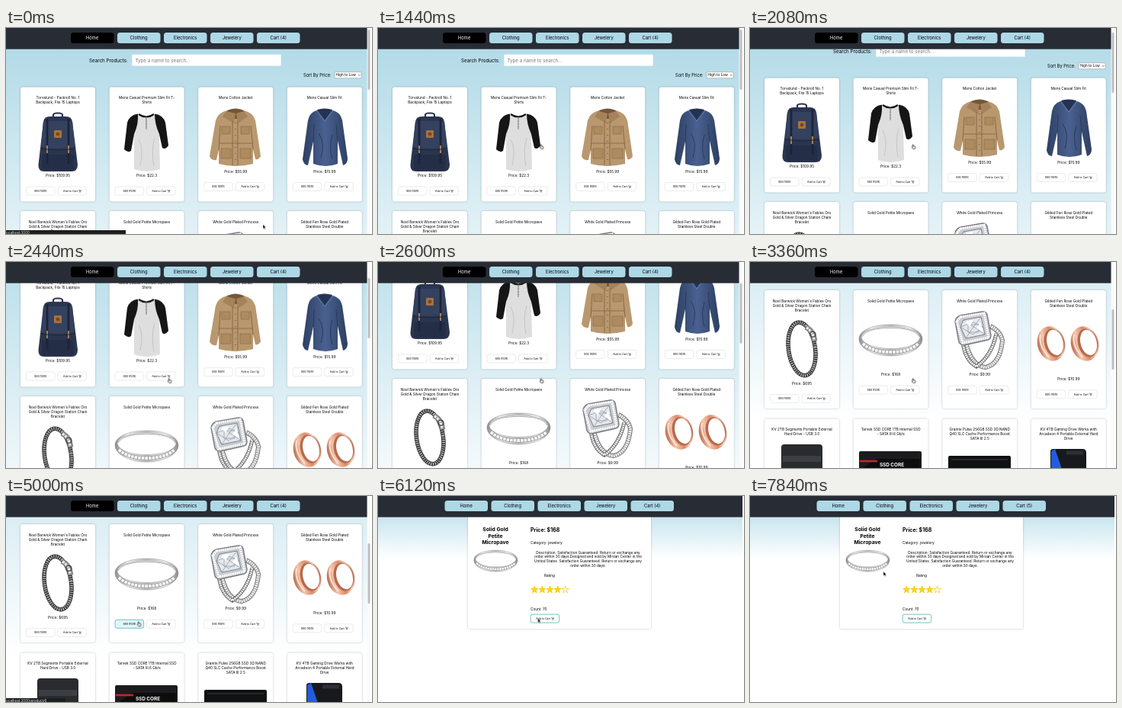
An HTML page for the animation above (8000 ms loop, 480 by 270 pixels).

```html
<!DOCTYPE html>
<html lang="en">
<head>
<meta charset="utf-8">
<title>Shop</title>
<style>
html, body { margin: 0; width: 100%; height: 100%; overflow: hidden; background: #fff; }
svg { display: block; width: 100vw; height: 100vh; font-family: Inter, Roboto, sans-serif; }
.card { fill: #fff; filter: drop-shadow(0 .4px 1px #0004); }
.btn { fill: #fff; stroke: #ddd; stroke-width: .6; }
.tab { fill: #add8e6; }
.mid { text-anchor: middle; }
.bold { font-weight: 700; }

#scroll, #thumb, #list, #nav2, #detail, #cursor, #arrow, #hand, #bar1, #bar2,
#four, #five, .hot, .add { animation: 8s linear infinite; }
#scroll { animation-name: scroll; }
#thumb { animation-name: thumb; }
#cursor { animation-name: move; }
.hot { animation-name: hot; }
.add { animation-name: add; }
#list, #nav2, #detail, #arrow, #hand, #bar1, #bar2, #four, #five { animation-timing-function: step-end; }
#list { animation-name: list; }
#nav2 { animation-name: nav2; }
#detail { animation-name: detail; }
#arrow { animation-name: arrow; }
#hand { animation-name: hand; }
#bar1 { animation-name: bar1; }
#bar2 { animation-name: bar2; }
#four { animation-name: four; }
#five { animation-name: five; }

@keyframes scroll {
  0% { transform: translateY(0); }
  24.5% { transform: translateY(0); animation-timing-function: steps(3); }
  26% { transform: translateY(-12px); animation-timing-function: steps(13); }
  32.5% { transform: translateY(-87px); animation-timing-function: steps(11); }
  38% { transform: translateY(-135px); animation-timing-function: steps(8); }
  42%, 100% { transform: translateY(-203px); }
}
@keyframes thumb {
  0% { transform: translateY(0); }
  24.5% { transform: translateY(0); animation-timing-function: steps(3); }
  26% { transform: translateY(3.5px); animation-timing-function: steps(13); }
  32.5% { transform: translateY(25.7px); animation-timing-function: steps(11); }
  38% { transform: translateY(40px); animation-timing-function: steps(8); }
  42%, 100% { transform: translateY(60px); }
}
@keyframes move {
  0%, 6.5% { transform: translate(337px, 257.5px); animation-timing-function: ease-in-out; }
  16.5%, 48.5% { transform: translate(212.5px, 152.5px); animation-timing-function: ease-in-out; }
  54%, 65.5% { transform: translate(172.5px, 164.5px); animation-timing-function: ease-in-out; }
  78.5%, 95.5% { transform: translate(211.5px, 160px); animation-timing-function: ease-in-out; }
  98%, 100% { transform: translate(175px, 99px); }
}
@keyframes hot { 0%, 53% { fill: #fff; stroke: #ddd; } 55%, 100% { fill: #e0f7fa; stroke: #159a9c; } }
@keyframes add { 0%, 77.5% { fill: #fff; } 78.5%, 95.5% { fill: #e0f7fa; } 97%, 100% { fill: #fff; } }
@keyframes list { 0% { visibility: visible; } 63%, 100% { visibility: hidden; } }
@keyframes nav2 { 0% { visibility: hidden; } 63%, 100% { visibility: visible; } }
@keyframes detail { 0% { visibility: hidden; } 65.5%, 100% { visibility: visible; } }
@keyframes arrow { 0% { opacity: 1; } 16.5% { opacity: 0; } 63% { opacity: 1; } 78% { opacity: 0; } 96%, 100% { opacity: 1; } }
@keyframes hand { 0% { opacity: 0; } 16.5% { opacity: 1; } 63% { opacity: 0; } 78% { opacity: 1; } 96%, 100% { opacity: 0; } }
@keyframes bar1 { 0% { opacity: 1; } 8%, 100% { opacity: 0; } }
@keyframes bar2 { 0% { opacity: 0; } 54% { opacity: 1; } 65.5%, 100% { opacity: 0; } }
@keyframes four { 0% { opacity: 1; } 90%, 100% { opacity: 0; } }
@keyframes five { 0% { opacity: 0; } 90%, 100% { opacity: 1; } }
</style>
</head>
<body>
<svg viewBox="0 0 480 270" preserveAspectRatio="none">
<defs>
  <linearGradient id="sky" x2="0" y2="1"><stop stop-color="#add8e6"/><stop offset="1" stop-color="#fff"/></linearGradient>
  <linearGradient id="silver"><stop stop-color="#8d8d90"/><stop offset=".2" stop-color="#eee"/><stop offset=".5" stop-color="#bbb"/><stop offset=".8" stop-color="#f2f2f2"/><stop offset="1" stop-color="#88888c"/></linearGradient>
  <linearGradient id="rose"><stop stop-color="#b9694a"/><stop offset=".25" stop-color="#f6c7ae"/><stop offset=".55" stop-color="#d98d6c"/><stop offset=".8" stop-color="#f8d5c2"/><stop offset="1" stop-color="#b8694b"/></linearGradient>
  <linearGradient id="denim"><stop stop-color="#2d3f62"/><stop offset=".5" stop-color="#4a6190"/><stop offset="1" stop-color="#2d3f62"/></linearGradient>

  <g id="ring">
    <path fill="url(#silver)" stroke="#77777b" stroke-width=".4" fill-rule="evenodd"
      d="M0 19C0 7 19 0 41.5 0S83 7 83 19 64 41 41.5 41 0 31 0 19ZM3 16.5C4 25 20 31.5 41.5 31.5S79 25 80 16.5C78 8 62 3 41.5 3S5 8 3 16.5Z"/>
    <path d="M5 25C14 33 27 36 41.5 36S69 33 78 25" fill="none" stroke="#999" stroke-width="5.4"/>
    <path d="M5 25C14 33 27 36 41.5 36S69 33 78 25" fill="none" stroke="#f7f7f7" stroke-width="3.8" stroke-dasharray="3.6 1"/>
    <path d="M4 16C9 7 24 4.500 41.500 4.500S74 7 79 16" fill="none" stroke="#aaa" stroke-width="1"/>
  </g>

  <g id="band">
    <ellipse cx="19" cy="23" rx="18" ry="23" fill="url(#rose)" transform="rotate(-14 19 23)"/>
    <ellipse cx="22.500" cy="22" rx="12.500" ry="19" fill="#b86a4c" transform="rotate(-14 22.5 22)"/>
    <ellipse cx="24" cy="21.500" rx="10.500" ry="17" fill="#fff" transform="rotate(-14 24 21.5)"/>
    <path d="M5 11Q2 26 16 41" fill="none" stroke="#fbe3d6" stroke-width="2"/>
  </g>

  <g id="trolley" fill="none" stroke="#333" stroke-width=".4">
    <path d="M0 .3H.8L1.500 2.500H3.300L3.800 .9H1M1.400 1.700H3.500"/>
    <circle cx="1.700" cy="3.300" r=".25"/><circle cx="3.100" cy="3.300" r=".25"/>
  </g>
</defs>

<g id="list">
  <g id="scroll">
    <rect width="474" height="413" fill="url(#sky)"/>
    <g id="search"></g>
    <g id="cards"></g>

    <!-- backpack -->
    <g>
      <path d="M62 119V114Q62 111.500 68 111.500T74 114V119" fill="none" stroke="#26314a" stroke-width="2.2"/>
      <path d="M49 123Q50 116 57 116H79Q86 116 87 123L94 179Q94 188 86 188H50Q42 188 42.500 179Z" fill="#2a354f"/>
      <path d="M49 122H87L90 156Q68 160 46 156Z" fill="#34415f"/>
      <path d="M47 166H89V186H47Z" fill="#242e46"/>
      <path d="M54 119V178M82 119V178" stroke="#1c2437" stroke-width="2.600"/>
      <path d="M54 154V164M82 154V164" stroke="#b58a5b" stroke-width="1.800"/>
      <path d="M46 158Q68 162 90 158" fill="none" stroke="#1d263b"/>
      <rect x="63" y="134" width="10" height="10" rx="1" fill="#a8713d"/>
      <circle cx="68" cy="139" r="2.300" fill="#6e4826"/>
    </g>

    <!-- raglan shirt -->
    <g>
      <path d="M171 113Q163 115 160 124L155 159Q160 164 164 161L168 141V185Q184 191 202 185L201 141L205 157Q209 158 213 154L209 124Q206 115 197 113Q184 119 171 113Z" fill="#dedede"/>
      <path d="M173 112.500Q162 114 159 124L155 159Q160 164 164 161L168 139Q174 126 173 112.500ZM195 112.500Q206 114 209 124L213 154Q209 160 205 157L201 139Q195 126 195 112.500Z" fill="#151515"/>
      <path d="M174 113Q184 120 194 113" fill="none" stroke="#151515" stroke-width="2.200"/>
      <path d="M184 117V133" stroke="#aaa" stroke-width="1.800"/>
      <path d="M184 118V133" stroke="#444" stroke-width=".8" stroke-dasharray=".8 3"/>
      <path d="M174 146Q181 158 176 180M195 144Q190 160 194 181" fill="none" stroke="#c5c5c5"/>
    </g>

    <!-- jacket -->
    <g>
      <path d="M290 108Q278 111 275 121L267 168Q269 174 276 173L279 160V178Q300 184 324 178V159L327 172Q332 173 334 168L327 121Q324 111 312 108Z" fill="#b9986f"/>
      <path d="M290 108Q301 103 312 108L308 119H295Z" fill="#745638"/>
      <path d="M289 109L284 116 299 125 301 112ZM312 109L317 116 304 125 302 112Z" fill="#a5835a"/>
      <path d="M297 122V180M304 122V180M279 160L281 128M324 159L321 128" fill="none" stroke="#80623f" stroke-width=".9"/>
      <path d="M283 129H294V139H283ZM308 129H319V139H308ZM282 158H295V171H282ZM307 158H321V171H307Z" fill="#ad8a60" stroke="#87683f" stroke-width=".6"/>
      <path d="M279 151H324" stroke="#8d6d48" stroke-width="1"/>
      <path d="M301 124V178" stroke="#594027" stroke-width="1" stroke-dasharray="1 7"/>
    </g>

    <!-- long sleeve -->
    <g>
      <path d="M407 108Q398 111 396 121L389 172Q390 179 396 180L403 149V178Q419 184 435 178V148L442 180Q448 178 448 171L441 121Q439 111 429 108Z" fill="url(#denim)"/>
      <path d="M408 107L418 121 428 107Q418 104 408 107Z" fill="#243352"/>
      <path d="M407 108L418 122 429 108" fill="none" stroke="#5d76a4" stroke-width="1.200"/>
      <path d="M403 149L404 126M435 148L433 126M410 138Q419 150 413 170M428 140Q423 156 428 172" fill="none" stroke="#263757" stroke-width=".9"/>
    </g>

    <!-- bracelet -->
    <g transform="rotate(-8 68 317)" fill="none">
      <ellipse cx="68" cy="317" rx="17.500" ry="35" stroke="#303030" stroke-width="5.500"/>
      <ellipse cx="68" cy="317" rx="17.500" ry="35" stroke="#ddd" stroke-width="3.600" stroke-dasharray="1.200 1.600"/>
      <ellipse cx="68" cy="317" rx="17.500" ry="35" stroke="#555" stroke-width="1" stroke-dasharray="2 1.300"/>
      <path d="M77 289Q87 296 86 309" stroke="#888" stroke-width="7"/>
      <path d="M78 290Q86 297 85.500 308" stroke="#eee" stroke-width="3" stroke-dasharray="3 1"/>
      <circle cx="85" cy="300" r="3.500" stroke="#444" stroke-width="1.200"/>
    </g>

    <use href="#ring" x="143" y="285"/>

    <!-- solitaire -->
    <g>
      <g fill="none">
        <path d="M283 309Q291 340 309 341Q328 337 331 306Q329 294 315 287" stroke="#77777b" stroke-width="6"/>
        <path d="M283 309Q291 340 309 341Q328 337 331 306Q329 294 315 287" stroke="#eee" stroke-width="4" stroke-dasharray="2.200 .7"/>
        <path d="M279 306Q281 331 297 340Q317 326 323 297" stroke="#66666a" stroke-width="5"/>
        <path d="M279 306Q281 331 297 340Q317 326 323 297" stroke="#f4f4f4" stroke-width="3" stroke-dasharray="2 .7"/>
      </g>
      <path d="M276 273L305 268Q310 268 311 272L316 299Q316 304 312 305L281 312Q276 312 274 308L269 281Q270 275 276 273Z" fill="#c9cbd0" stroke="#77797f" stroke-width="1.400"/>
      <path d="M276 275L307 270 313 302 279 309 271 281Z" fill="none" stroke="#fff" stroke-width="3" stroke-dasharray="2 .8"/>
      <path d="M280 279L303 275 308 298 283 303 276 288Z" fill="#e5e9ee" stroke="#666b73" stroke-width=".8"/>
      <path d="M280 279L295 289 308 298M303 275L291 291 283 303M276 288L293 282 306 288 292 298ZM286 285H300V295H286Z" fill="none" stroke="#8b929b" stroke-width=".7"/>
      <path d="M282 281L293 279 288 288ZM302 282L306 295 297 290Z" fill="#fff"/>
    </g>

    <use href="#band" x="376" y="287"/>
    <use href="#band" x="420" y="287"/>

    <!-- drives -->
    <path d="M41 480V446Q41 442 45 442H91Q95 442 95 446V480Z" fill="#292b2e"/>
    <path d="M43 461H93" stroke="#3b3e42" stroke-width="8"/>
    <rect x="143" y="451" width="82" height="30" rx="2" fill="#1c1c1e"/>
    <path d="M145 475L166 461H223V480H145Z" fill="#0d0d0e"/>
    <path d="M144 464H167" stroke="#c5262d" stroke-width="2.500"/>
    <rect x="260" y="457" width="82" height="25" rx="2" fill="#101113"/>
    <path d="M264 462H338" stroke="#25272a" stroke-width="2"/>
    <path d="M394 480V451Q394 448 398 448H436Q441 448 441 453V480Z" fill="#17191d"/>
    <path d="M395 480V451L400 448 411 480Z" fill="#245be0"/>
    <path d="M415 453H437" stroke="#2c3036" stroke-width="5"/>
    <text x="186" y="470.500" class="mid bold" font-size="6.400" fill="#fff">SSD CORE</text>
  </g>
  <rect x="473.500" width="4.500" height="270" fill="#fafafa"/>
  <rect id="thumb" x="474.500" y="2" width="3" height="79" rx="1.500" fill="#bfbfbf"/>
  <g id="nav1"></g>
</g>

<g id="nav2">
  <rect width="478" height="82" fill="url(#sky)"/>
  <g id="detail"></g>
  <g id="tabs"></g>
</g>

<g id="bar1"><rect y="265" width="157" height="5" fill="#1d1e20"/><text x="-1" y="270" font-size="4.500" fill="#ddd">localhost:3000</text></g>
<g id="bar2"><rect y="265" width="78" height="5" fill="#1d1e20"/><text x="-1" y="270" font-size="4.500" fill="#ddd">localhost:3000/product/6</text></g>

<g id="cursor">
  <path id="arrow" d="M0 0V5.600L1.300 4.500 2.200 6.500 3.100 6.100 2.200 4.200H4Z" fill="#000" stroke="#fff" stroke-width=".4"/>
  <path id="hand" d="M.8 .5Q1.400 0 1.800 .6V2.200L4 2.700Q4.600 3 4.400 4.200L3.900 6H1.500L-.3 3.700Q0 3 .8 3.600Z" fill="#fff" stroke="#000" stroke-width=".7"/>
</g>
</svg>

<script>
const put = (id, html) => { document.getElementById(id).innerHTML = html; };
const text = (x, y, s, size, cls = "", fill = "#000") =>
  `<text x="${x}" y="${y + size * .36}" font-size="${size}" class="${cls}" fill="${fill}">${s}</text>`;
const box = (x, y, w, h, r, cls) => `<rect x="${x}" y="${y}" width="${w}" height="${h}" rx="${r}" class="${cls}"/>`;
const lines = (x, y, list, gap, size, cls) => list.map((s, i) => text(x, y + i * gap, s, size, cls)).join("");

const addButton = (x, y, cls) => box(x, y - 5.5, 37.5, 11, 2.5, "btn " + cls) +
  text(x + 7, y, "Add to Cart", 3.5) + `<use href="#trolley" x="${x + 26.8}" y="${y - 1.8}"/>`;

function card(row, col, [title, price, y]) {
  const x = 19 + col * 116.6, mid = x + 49;
  const [top, height] = [[77.5, 150], [240, 155], [408.5, 155]][row];
  let out = box(x, top, 98, height, 3, "card") + lines(mid, top + 14.3, title, 5.8, 4.7, "mid");
  if (!price) return out;
  const by = y + 20, hot = row === 1 && col === 1 ? "hot" : "";
  return out + text(mid, y, "Price: $" + price, 4.75, "mid") +
    box(x + 7.5, by - 5.5, 37.5, 11, 2.5, "btn " + hot) +
    text(x + 26.2, by, "See more", 3.7, "mid") + addButton(x + 49, by, "");
}

const goods = [
  [
    [["Torvelund - Packroll No. 1", "Backpack, Fits 15 Laptops"], "109.95", 193.5],
    [["Mens Casual Premium Slim Fit T-", "Shirts"], "22.3", 193.5],
    [["Mens Cotton Jacket"], "55.99", 188],
    [["Mens Casual Slim Fit"], "15.99", 188]
  ], [
    [["Noel Barwick Women's Fables Oro", "Gold &amp; Silver Dragon Station Chain", "Bracelet"], "695", 362],
    [["Solid Gold Petite Micropave"], "168", 350.7],
    [["White Gold Plated Princess"], "9.99", 350.7],
    [["Gilded Fen Rose Gold Plated", "Stainless Steel Double"], "10.99", 356.3]
  ], [
    [["KV 2TB Segments Portable External", "Hard Drive - USB 3.0"]],
    [["Tarvek SSD CORE 1TB Internal SSD", "- SATA III 6 Gb/s"]],
    [["Granite Pulse 256GB SSD 3D NAND", "Q40 SLC Cache Performance Boost", "SATA III 2.5"]],
    [["KV 4TB Gaming Drive Works with", "Arcadeon 4 Portable External Hard", "Drive"]]
  ]
];

const labels = ["Home", "Clothing", "Electronics", "Jewelery"];
function nav(width, left, active, cart) {
  const tab = (i, on) => `<rect x="${left + i * 61}" y="6" width="56.5" height="14" rx="3.5" fill="${on ? "#000" : "#add8e6"}"/>`;
  return `<rect width="${width}" height="27.7" fill="#282c34"/>` +
    labels.map((s, i) => tab(i, i === active) +
      text(left + 28.2 + i * 61, 13, s, 5.8, "mid", i === active ? "#fff" : "#000")).join("") +
    tab(4) + cart;
}

put("search",
  text(109, 42.3, "Search Products:", 6.25) +
  `<rect x="165.2" y="34.700" width="195.600" height="15" rx="1" fill="#fff" stroke="#d5e4e9" stroke-width=".5"/>` +
  text(169.5, 42.3, "Type a name to search...", 6.2, "", "#777") +
  text(390, 61.8, "Sort By Price:", 5.7) +
  `<rect x="431" y="57.700" width="35" height="8" rx="1" fill="#fff" stroke="#888" stroke-width=".5"/>` +
  text(432.5, 61.8, "High to Low", 4.7) +
  `<path d="M462 61.200L463.200 62.400 464.400 61.200" fill="none" stroke="#000" stroke-width=".6"/>`);
put("cards", goods.map((row, r) => row.map((g, c) => card(r, c, g)).join("")).join(""));
put("nav1", nav(473.5, 85, 0, text(357.2, 13, "Cart (4)", 5.8, "mid")));
put("tabs", nav(478, 87.5, -1,
  `<g id="four">${text(359.7, 13, "Cart (4)", 5.8, "mid")}</g>` +
  `<g id="five">${text(359.7, 13, "Cart (5)", 5.8, "mid")}</g>`));

const star = (cx, full) => {
  const pts = Array.from({ length: 10 }, (_, i) => {
    const a = i * Math.PI / 5, r = i % 2 ? 2 : 4.9;
    return (cx + r * Math.sin(a)).toFixed(2) + "," + (122.9 - r * Math.cos(a)).toFixed(2);
  });
  return `<polygon points="${pts.join(" ")}" fill="${full ? "#ffd700" : "#fff"}" stroke="#f0c400" stroke-width=".7"/>`;
};

put("detail",
  box(118, 20, 240, 154.3, 3, "card") +
  lines(154, 44, ["Solid Gold", "Petite", "Micropave"], 8.5, 6.8, "mid bold") +
  `<use href="#ring" transform="translate(125.800 71) scale(.69)"/>` +
  text(200, 44, "Price: $168", 7, "bold") +
  text(200, 61, "Category: jewelery", 4.7) +
  lines(275.5, 74, [
    "Description: Satisfaction Guaranteed. Return or exchange any",
    "order within 30 days.Designed and sold by Mirzan Center in the",
    "United States. Satisfaction Guaranteed. Return or exchange any",
    "order within 30 days."
  ], 5.8, 4.7, "mid") +
  text(225, 104.2, "Rating", 4.7, "mid") +
  [0, 1, 2, 3, 4].map(i => star(205.3 + i * 10.1, i < 4)).join("") +
  text(200, 148.5, "Count: 70", 4.7) +
  `<g style="--c:#159a9c">${addButton(200.2, 160.6, "add")}</g>`);
document.querySelector(".add").style.stroke = "#159a9c";
</script>
</body>
</html>
```
